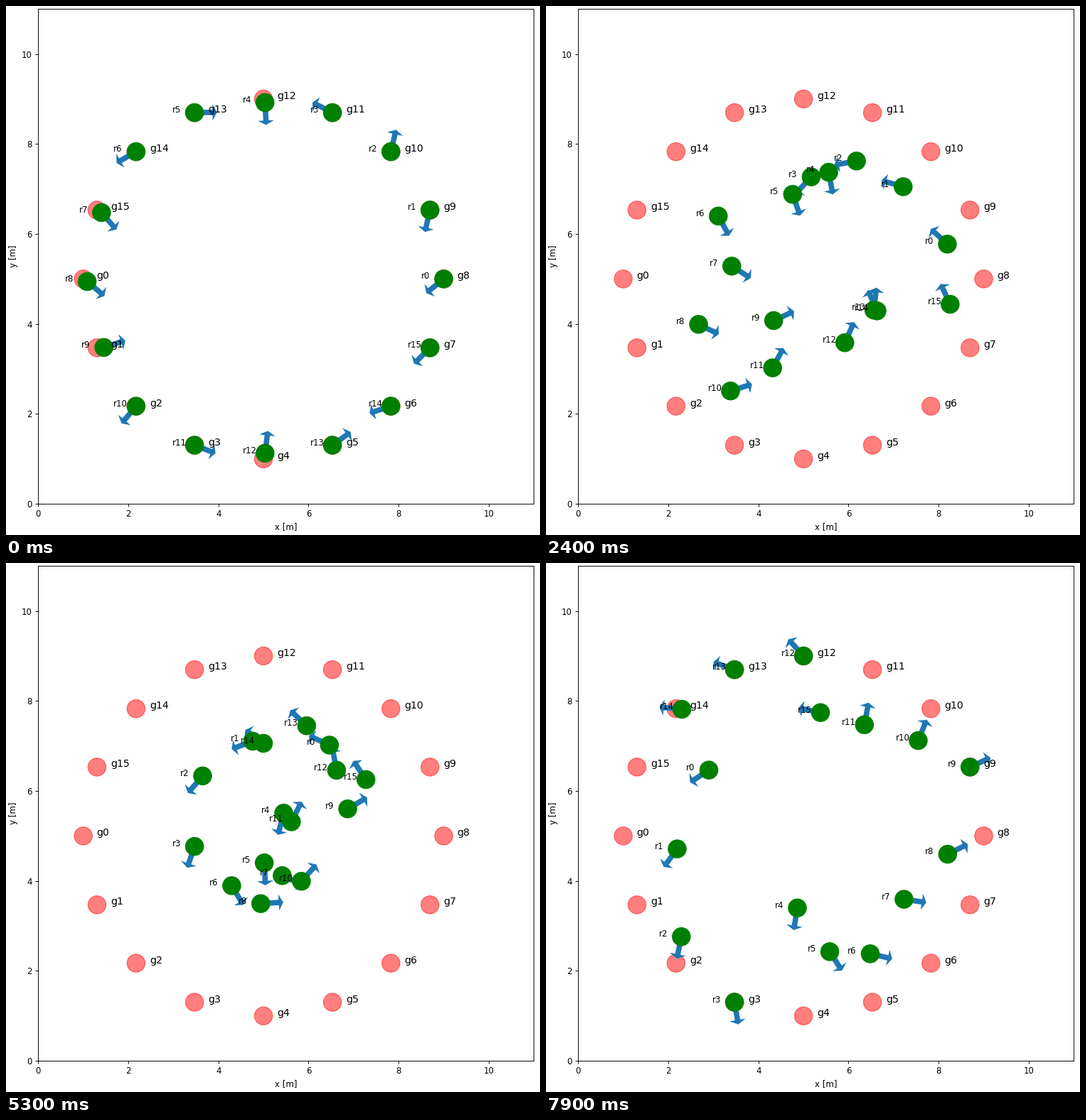
These frames come from a looping animation (751 by 745 pixels, 8000 ms). A matplotlib script:

```python
import numpy as np
import matplotlib.pyplot as plt
from matplotlib.animation import FuncAnimation
from matplotlib.patches import Circle, Polygon

W, H, DPI = 751, 745, 85
FRAMES, INTERVAL = 80, 100
COUNT, RADIUS, RING = 16, 0.2, 4
MID, END = 46, 80         # steps at which the progress is given
TURN, CONE = 9, 20        # degrees turned per step, misalignment allowed to drive

# Unit arrow pointing along +x, scaled by length and width
ARROW = np.array([[0, .1], [0, -.1], [.8, -.1], [.8, -.3],
                  [1, 0], [.8, .3], [.8, .1]]) * [0.5, 0.6]

fig = plt.figure(figsize=(W / DPI, H / DPI), dpi=DPI)
ax = fig.add_axes([45.3 / W, 43.8 / H, 697 / W, 697 / H])
ax.set(xlim=(0, 11), ylim=(0, 11), xlabel="x [m]", ylabel="y [m]",
       xticks=range(0, 11, 2), yticks=range(0, 11, 2))


def unit(deg):
    a = np.radians(deg)
    return np.array([np.cos(a), np.sin(a)])


def hermite(t, t0, t1, p, q, a, b):
    """Cubic from p to q with end slopes a and b."""
    dt = t1 - t0
    u = np.clip((t - t0) / dt, 0, 1)
    ease = u * u * (3 - 2 * u)
    return p + (q - p) * ease + dt * u * (1 - u) * (a * (1 - u) - b * u)


class Robot:
    """Crosses the ring to the far side, swerving around the crowded centre.

    mid and end tell how far along its diameter the robot is (4 start, -4 goal),
    bulge how far it swerves to the side.
    """

    def __init__(self, i, heading, mid, end, bulge):
        self.angle = 360 / COUNT * i
        self.mid, self.end, self.bulge = mid, end, bulge
        self.skew = 0.35 * np.cos(np.radians(2 * self.angle - 45)) - 0.15
        self.turn = (heading - self.course(RING) + 180) % 360 - 180
        self.delay = max(abs(self.turn) - CONE, 0) / TURN

        self.arrow = ax.add_patch(Polygon(ARROW, fc="C0", ec="none", zorder=2))
        self.body = ax.add_patch(Circle((0, 0), RADIUS, color="g", zorder=3))
        self.label = ax.text(0, 0, f"r{i}", fontsize=10, zorder=4)

    def along(self, t):
        first = (self.mid - RING) / (MID - self.delay)
        last = (self.end - self.mid) / (END - MID)
        middle = 2 * first * last / (first + last)
        if t < MID:
            return hermite(t, self.delay, MID, RING, self.mid, 1.3 * first, middle)
        brake = min(1, RING + self.end)
        return hermite(t, MID, END, self.mid, self.end, middle, last * brake)

    def aside(self, s):
        a = np.pi * s / (2 * RING)
        return self.bulge * np.cos(a) + self.skew * np.sin(2 * a)

    def course(self, s):
        """Direction of the path at position s, in degrees."""
        k = np.pi / (2 * RING)
        slope = k * (2 * self.skew * np.cos(2 * k * s) - self.bulge * np.sin(k * s))
        return self.angle + 180 + np.degrees(np.arctan(slope))

    def draw(self, frame):
        s = self.along(frame + 1)
        pos = 5 + s * unit(self.angle) + self.aside(s) * unit(self.angle + 90)
        left = np.sign(self.turn) * max(abs(self.turn) - TURN * frame, 0)
        c, n = unit(self.course(s) + left)
        self.body.center = pos
        self.arrow.set_xy(pos + ARROW @ np.array([[c, n], [-n, c]]))
        self.label.set_position(pos - [0.5, 0])


for i in range(COUNT):
    x, y = 5 - RING * unit(360 / COUNT * i)
    ax.add_patch(Circle((x, y), RADIUS, color="r", alpha=0.5, zorder=1))
    ax.text(x + 0.3, y, f"g{i}", fontsize=12, zorder=4)

# heading, mid, end, bulge
robots = [
    Robot(0, 219, 2.2, -2.1, 2.3),
    Robot(1, 257, 1.4, -2.7, 2.0),
    Robot(2, 77, 1.0, -3.5, 1.9),
    Robot(3, 153, 0.3, -4, 1.3),
    Robot(4, 273, 1.1, -1.6, -0.3),
    Robot(5, 1, 0.1, -2.6, 0),
    Robot(6, 210, 0.5, -2.9, 1.2),
    Robot(7, 311, -0.1, -2.6, 0.6),
    Robot(8, 320, 0.9, -3.2, 1.5),
    Robot(9, 18, -1.1, -4, 0.5),
    Robot(10, 230, 1.1, -3.3, 1.3),
    Robot(11, 339, 0.2, -2.8, 0.4),
    Robot(12, 83, -0.5, -4, 1.5),
    Robot(13, 36, -1.0, -4, 1.8),
    Robot(14, 198, -0.5, -3.9, 1.3),
    Robot(15, 225, 2.2, -0.7, 2.7),
]


def update(frame):
    for robot in robots:
        robot.draw(frame)


anim = FuncAnimation(fig, update, frames=FRAMES, interval=INTERVAL,
                     init_func=lambda: update(0), repeat=True, repeat_delay=0)
plt.show()
```
